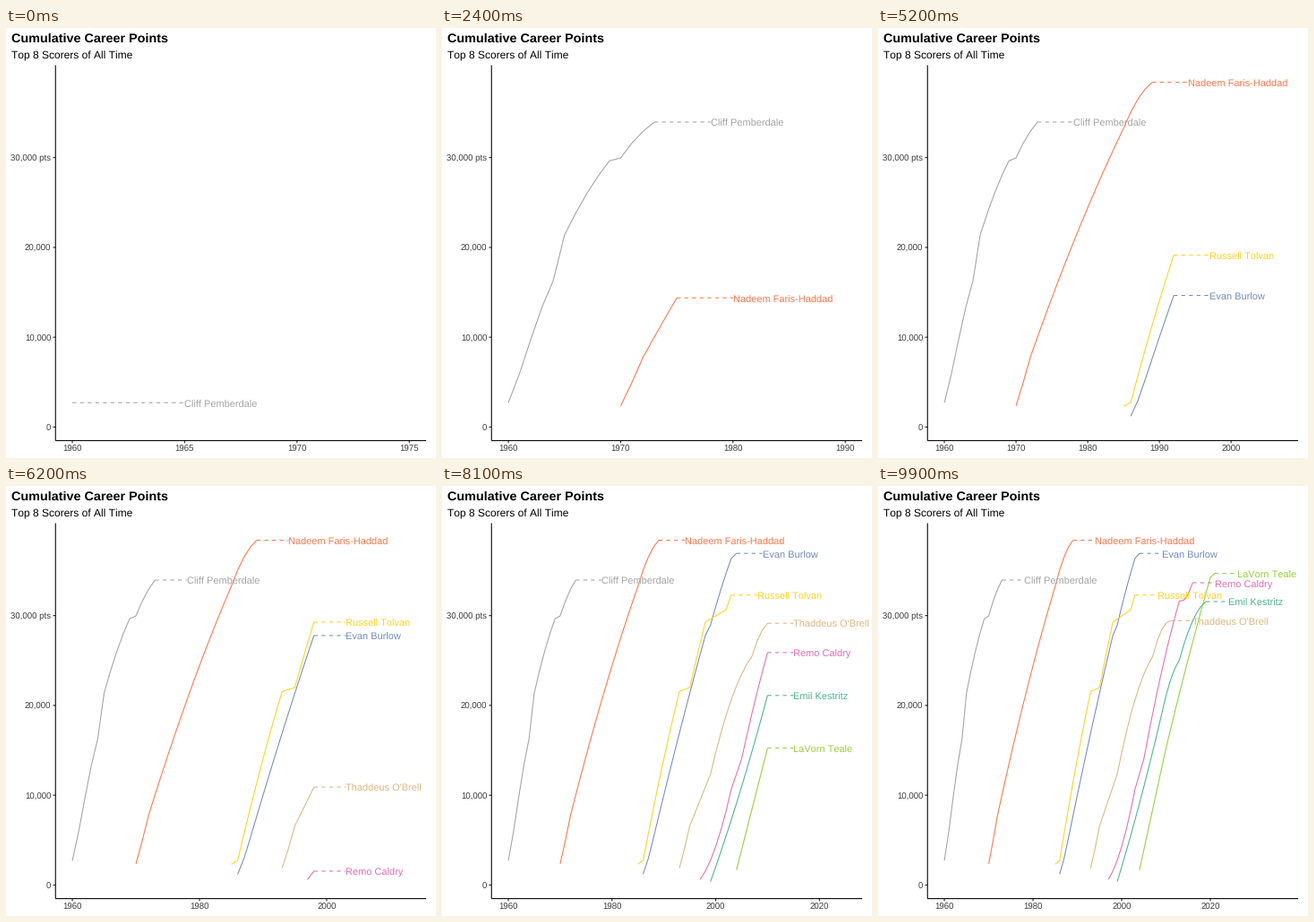
A matplotlib script for the animation above (10 s loop, 480 px wide and 480 px high).

```python
import numpy as np
import matplotlib.pyplot as plt
from matplotlib.animation import FuncAnimation

SIZE, DPI = 480, 72
FRAMES, INTERVAL = 100, 100
FIRST, LAST = 1960, 2021
LABEL_GAP, VIEW_GAP = 5, 15

# Panel edges in pixels, y pointing down
LEFT, RIGHT, TOP, BOTTOM = 55.25, 469, 41.5, 460.6
LINE_W, TICK = 1.067, 2.75
TEXT_GREY, TICK_GREY = "#3c3c3c", "#222222"

plt.rcParams.update({
    "font.family": "Liberation Sans",
    "text.hinting": "none",
    "text.kerning_factor": 6,
    "path.snap": False,
})


def stint(seasons, first, last=None):
    """Points per season, drifting evenly from first to last."""
    return np.linspace(first, first if last is None else last, seasons)


def key_frame(year):
    """Frame on which a season's total is reached."""
    return np.round((FRAMES - 1) * (year - FIRST) / (LAST - FIRST))


def career(name, color, start, *stints):
    totals = np.cumsum(np.concatenate([stint(*s) for s in stints]))
    years = start + np.arange(len(totals))
    return name, color, key_frame(years), years, totals


SERIES = [
    career("Emil Kestritz", "#4db38f", 1999,
           (1, 385), (11, 1640, 2128), (3, 1695, 930), (6, 1700, 470)),
    career("Nadeem Faris-Haddad", "#fb774c", 1970,
           (3, 2360, 2825), (13, 2250, 1670), (4, 1800, 765)),
    career("Evan Burlow", "#758cbf", 1986,
           (3, 1200, 2300), (10, 2400, 2105), (1, 1165), (4, 2050, 1665),
           (1, 555)),
    career("Remo Caldry", "#e16eb4", 1997,
           (7, 620, 2425), (2, 1690), (8, 2600, 1795), (3, 85, 1270)),
    career("LaVorn Teale", "#95d03e", 2004,
           (1, 1655), (6, 2265), (10, 2045, 1755), (1, 450)),
    career("Russell Tolvan", "#ffd222", 1985,
           (2, 2313, 408), (7, 2980, 2397), (2, 228), (3, 2490, 2360),
           (4, 344), (1, 1640)),
    career("Thaddeus O'Brell", "#deb680", 1993,
           (3, 1895, 2495), (4, 1440), (8, 2390, 890), (4, 1700, 285)),
    career("Cliff Pemberdale", "#a4a4a4", 1960,
           (3, 2707, 3806), (2, 3590, 2945), (1, 5070), (4, 2450, 1680),
           (1, 328), (3, 1640, 1020)),
]
LOW = min(s[4][0] for s in SERIES)
HIGH = max(s[4][-1] for s in SERIES)


def y_px(points):
    pad = (BOTTOM - TOP) * 0.05 / 1.1
    return BOTTOM - pad - (points - LOW) / (HIGH - LOW) * (BOTTOM - TOP) / 1.1


def nice_breaks(lo, hi, target=5):
    """Axis breaks by simplicity, coverage and density."""
    span = hi - lo
    best, result = -9, []
    bases = [1, 5, 2, 2.5, 4, 3]
    for scale in (1, 10):
        for rank, base in enumerate(bases):
            step = base * scale
            if not span / 12 < step < span:
                continue
            simple = 1 - rank / (len(bases) - 1)
            first = int(np.floor(lo / step))
            for i in range(first - 1, first + 4):
                for count in range(2, 11):
                    a, b = i * step, (i + count - 1) * step
                    cover = 1 - 0.5 * ((hi - b)**2 + (lo - a)**2) / (0.1 * span)**2
                    r = (count - 1) / (b - a)
                    rt = (target - 1) / (max(b, hi) - min(a, lo))
                    dense = 2 - max(r / rt, rt / r)
                    score = 0.25 * simple + 0.2 * cover + 0.5 * dense + 0.05
                    if score > best + 1e-9:
                        best, result = score, a + step * np.arange(count)
    return [v for v in result if lo <= v <= hi]


fig = plt.figure(figsize=(SIZE / DPI, SIZE / DPI), dpi=DPI, facecolor="white")
ax = fig.add_axes([0, 0, 1, 1])


def stroke(xs, ys, color, **kw):
    ax.plot(xs, ys, color=color, lw=LINE_W, solid_capstyle="butt",
            dash_capstyle="butt", solid_joinstyle="round", snap=False, **kw)


def write(x, y, text, size, color="black", **kw):
    ax.text(x, y, text, fontsize=size, color=color, va="baseline", **kw)


def draw_axes(x_px, lo, hi):
    write(5.5, 16, "Cumulative Career Points", 14.4, weight="bold")
    write(5.5, 34.4, "Top 8 Scorers of All Time", 12)
    for value in range(0, 40000, 10000):
        y = y_px(value)
        stroke([LEFT - TICK, LEFT], [y, y], TICK_GREY)
        label = f"{value:,}" + (" pts" if value == 30000 else "")
        write(LEFT - TICK - 2.2, y + 4.2, label, 9.6, TEXT_GREY, ha="right")
    for year in nice_breaks(lo, hi):
        x = x_px(year)
        stroke([x, x], [BOTTOM, BOTTOM + TICK], TICK_GREY)
        write(x, 473.2, f"{year:g}", 9.6, TEXT_GREY, ha="center")
    stroke([LEFT, LEFT], [TOP, BOTTOM], "black", zorder=2.5)
    stroke([LEFT, RIGHT], [BOTTOM, BOTTOM], "black", zorder=2.5)


def draw(frame):
    ax.clear()
    ax.set(xlim=(0, SIZE), ylim=(SIZE, 0))
    ax.axis("off")

    live = []
    for name, color, keys, years, totals in SERIES:
        if frame >= keys[0]:
            past = keys <= frame
            x = np.append(years[past], np.interp(frame, keys, years))
            y = np.append(totals[past], np.interp(frame, keys, totals))
            live.append((name, color, x, y_px(y)))

    now = max(x[-1] for _, _, x, _ in live)
    width = now + VIEW_GAP - FIRST
    lo, hi = FIRST - 0.05 * width, FIRST + 1.05 * width

    def x_px(year):
        return LEFT + (year - lo) / (hi - lo) * (RIGHT - LEFT)

    draw_axes(x_px, lo, hi)
    for name, color, x, y in live:
        tip, end = x_px(x[-1]), x_px(x[-1] + LABEL_GAP)
        if x[-1] > x[0]:
            stroke(x_px(x), y, color, zorder=2)
        stroke([tip, end], [y[-1], y[-1]], color, ls=(0, (4, 4)), zorder=2.2)
        write(end, y[-1] + 5.2, name, 11, color, zorder=3)
    return []


anim = FuncAnimation(fig, draw, frames=FRAMES, init_func=lambda: [],
                     interval=INTERVAL, repeat=True, repeat_delay=0)
plt.show()
```
